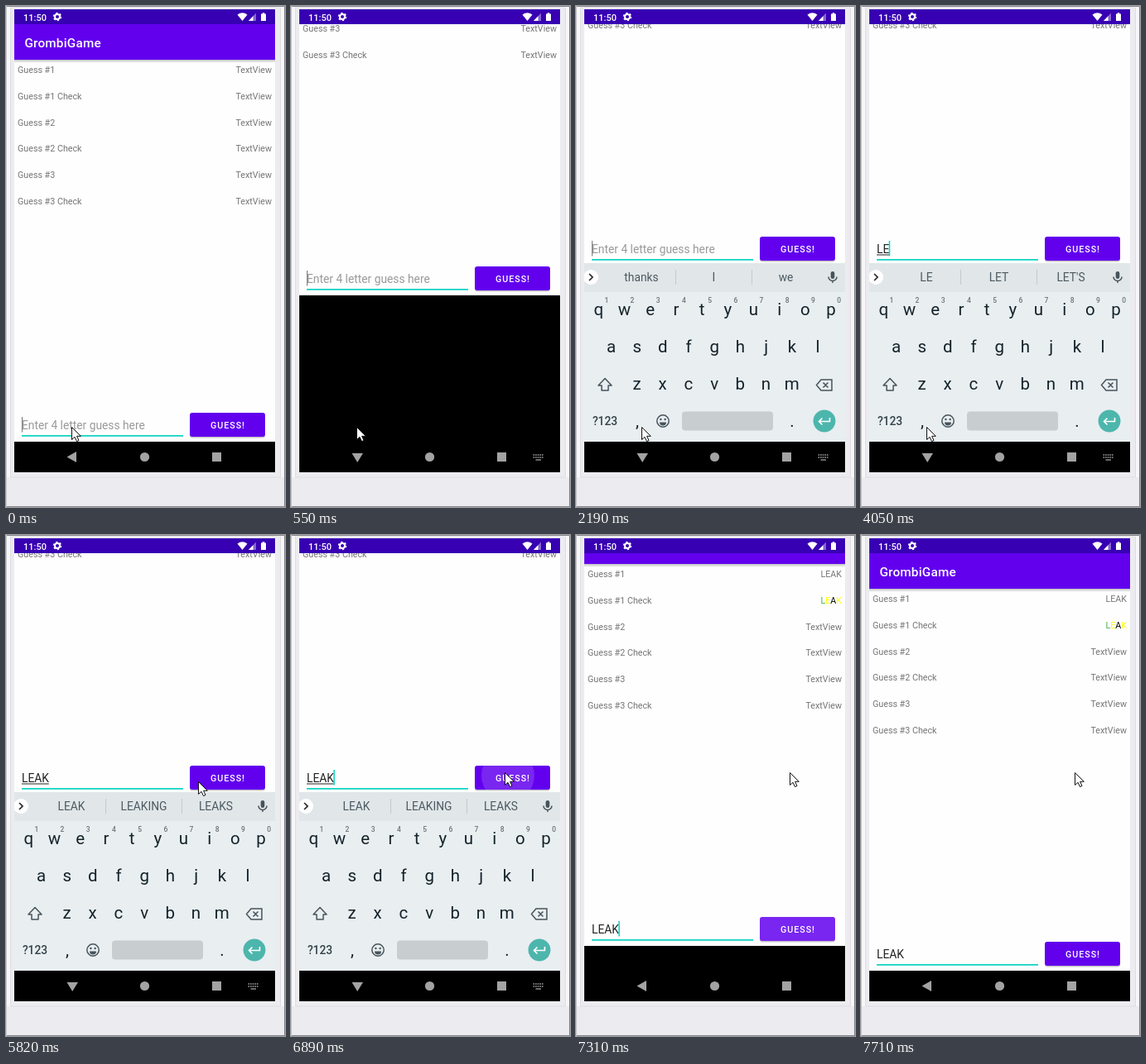
An HTML page for the animation above (8 s loop, 337 px wide and 606 px high).

```html
<!DOCTYPE html>
<html lang="en">
<head>
<meta charset="utf-8">
<title>Word guessing app</title>
<style>
  html, body { margin: 0; width: 100%; height: 100%; overflow: hidden; background: #ececf0; }
  svg { display: block; width: 337px; height: 606px; font-family: Roboto, sans-serif; }
  .row { font-size: 10.73px; fill: #757575; }
  .end { text-anchor: end; }
  .mid { text-anchor: middle; }
  .field { font-size: 13.8px; }
  .key { font-size: 20.5px; fill: #14232a; text-anchor: middle; }
  .num { font-size: 8.5px; font-weight: 500; fill: #6b7478; text-anchor: middle; }
  .sug { font-size: 13.8px; fill: #4c5a61; text-anchor: middle; }
  .line { fill: none; stroke: #46545b; stroke-width: 1.5; }
</style>
</head>
<body>
<svg viewBox="0 0 337 606">
  <defs>
    <clipPath id="screen"><rect x="10" y="22" width="315" height="542"/></clipPath>
    <clipPath id="btnClip"><rect x="222" y="492" width="91" height="29" rx="3"/></clipPath>
    <linearGradient id="shade" x2="0" y2="1">
      <stop stop-color="#000" stop-opacity=".25"/><stop offset="1" stop-color="#000" stop-opacity="0"/>
    </linearGradient>
  </defs>

  <!-- phone shell -->
  <rect width="337" height="606" fill="#ececf0"/>
  <path d="M0 0H5V570H0ZM331 0H336V570H331Z" fill="#f7f7f9"/>
  <path d="M5.5 2V570H331.5V2" fill="none" stroke="#dcdce1"/>
  <path d="M0 .5H336.5V606M0 605.5H337" fill="none" stroke="#85858a"/>
  <path d="M.5 0V606" stroke="#c9c9ce"/>
  <rect x="10" y="4" width="315" height="560"/>

  <g clip-path="url(#screen)">
    <g id="board">
      <rect x="10" y="311" width="315" height="36" fill="#e1e6e9"/>
      <rect x="10" y="346" width="315" height="181" fill="#e9eef1"/>
      <circle cx="18" cy="328" r="9" fill="#fff"/>
      <path d="M16 324l4 4-4 4" fill="none" stroke="#222" stroke-width="1.6"/>
      <path d="M120.5 319V337M212.5 319V337" stroke="#c3c9cc"/>
      <text class="sug" x="79" y="333"></text>
      <text class="sug" x="166.5" y="333"></text>
      <text class="sug" x="253.5" y="333"></text>
      <rect x="307.7" y="321" width="4.6" height="9" rx="2.3" fill="#46545b"/>
      <path class="line" d="M305 327.5a5 5 0 0 0 10 0M310 332.5V335" stroke-width="1.3"/>
      <g id="keys"></g>
      <path class="line" d="M35 450.5L43 459H39V465H31V459H27Z" stroke-linejoin="round"/>
      <path class="line" d="M296 452H309V465H296L290.500 458.500ZM298.500 455.500l6 6m0-6l-6 6"/>
      <text class="mid" x="35" y="507" font-size="13.8" font-weight="500" fill="#33434a">?123</text>
      <circle class="line" cx="105" cy="502" r="7.2"/>
      <circle cx="102.400" cy="500" r="1.200" fill="#46545b"/><circle cx="107.600" cy="500" r="1.200" fill="#46545b"/>
      <path d="M101 503.500h8a4 4 0 0 1-8 0Z" fill="#46545b"/>
      <rect x="128" y="490.500" width="110" height="23" rx="4" fill="#c8cdd0"/>
      <circle cx="300" cy="502" r="13.500" fill="#4db6ac"/>
      <path d="M306.500 498V502.500H294M297.500 498.500l-4 4 4 4" fill="none" stroke="#fff" stroke-width="1.600"/>
    </g>

    <g id="app">
      <rect x="10" y="22" width="315" height="505" fill="#fefefe"/>
      <rect x="10" y="65" width="315" height="4" fill="url(#shade)"/>
      <rect x="10" y="22" width="315" height="43" fill="#6200ee"/>
      <text x="22.500" y="49.500" font-size="15.300" font-weight="500" letter-spacing=".2" fill="#fff">GrombiGame</text>
      <g id="rows"></g>
      <text id="word" class="field" x="19" y="512"></text>
      <rect id="under" x="19" y="513.500" height="1" fill="#222"/>
      <rect x="19" y="519" width="195" height="1.800" fill="#16d5c4"/>
      <rect id="caret" y="497" height="18.500"/>
      <rect x="222" y="493.500" width="91" height="29" rx="3" fill="#000" opacity=".22"/>
      <rect x="222" y="492" width="91" height="29" rx="3" fill="#6200ee"/>
      <g clip-path="url(#btnClip)"><circle id="ripple" cx="262" cy="504" fill="#fff" opacity=".15"/></g>
      <text x="247" y="511" font-size="10.730" font-weight="500" letter-spacing=".96" fill="#fff">GUESS!</text>
    </g>
    <rect id="strip" x="10" y="311" width="315" height="4" fill="#e1e6e9"/>
  </g>

  <!-- status bar -->
  <rect x="10" y="4" width="315" height="18" fill="#3700b3"/>
  <text x="21" y="17.500" font-size="11" font-weight="500" fill="#fff">11:50</text>
  <circle cx="62" cy="13" r="3" fill="none" stroke="#fff" stroke-width="2"/>
  <circle cx="62" cy="13" r="4.400" fill="none" stroke="#fff" stroke-width="1.600" stroke-dasharray="2.300 2.308"/>
  <path d="M279.500 10.500Q285.500 6 291.500 10.500L285.500 18Z" fill="#fff"/>
  <path d="M302 8.500V18H293Z" fill="#fff" opacity=".4"/>
  <path d="M298.500 12.200V18H293Z" fill="#fff"/>
  <path d="M308 9.500H309.700V8.300H312.300V9.500H314V18H308Z" fill="#fff"/>

  <!-- navigation bar -->
  <g fill="#a3a3a3">
    <path id="back"/>
    <circle cx="167.500" cy="545.500" r="5.600"/>
    <rect x="249" y="540" width="11" height="11"/>
    <path id="dots" d="M292.500 543H305M292.500 546H305" stroke="#a3a3a3" stroke-width="1.600" stroke-dasharray="1.600 1"/>
  </g>
  <path id="dash" d="M295.500 549H302" stroke="#a3a3a3" stroke-width="1.300"/>

  <path id="mouse" d="M.5 .5V15.500L4 12.300L6.500 17.600L9 16.500L6.600 11.300H11.300Z" fill="#fff" stroke="#111" stroke-width="1"/>
</svg>
<script>
const $ = id => document.getElementById(id);
const LOOP = 8000;
const CARET_X = [19, 26, 33.600, 43, 51.300];

function add(parent, cls, x, y, str) {
  const el = document.createElementNS('http://www.w3.org/2000/svg', 'text');
  el.setAttribute('class', cls);
  el.setAttribute('x', x);
  el.setAttribute('y', y);
  el.textContent = str;
  parent.append(el);
  return el;
}

// guess list
const results = [];
for (let i = 0; i < 6; i++) {
  const y = 81 + i * 31.800;
  add($('rows'), 'row', 14, y, `Guess #${(i >> 1) + 1}${i % 2 ? ' Check' : ''}`);
  results.push(add($('rows'), 'row end', 321, y, 'TextView'));
}
const checked = add($('rows'), 'row end', 321, 112.800, '');
checked.innerHTML = [['L', '#4caf50'], ['E', '#ffff00'], ['A', '#000'], ['K', '#ffff00']]
  .map(([ch, col]) => `<tspan fill="${col}">${ch}</tspan>`).join('');

// keyboard letters
[['qwertyuiop', 27.300, 374], ['asdfghjkl', 42.500, 419], ['zxcvbnm', 73.500, 464]].forEach(([letters, x0, y], r) => {
  [...letters].forEach((ch, i) => {
    const x = x0 + i * 31.200;
    add($('keys'), 'key', x, y, ch);
    if (!r) add($('keys'), 'num', x + 9.500, 359, (i + 1) % 10);
  });
});
add($('keys'), 'key', 74, 509, ',');
add($('keys'), 'key', 261, 509, '.');

// each step changes only the listed properties
const steps = [
  [0, { pan: 0, board: 0, open: 0, word: '', caret: 1, compose: 0, ripple: 0, done: 0, mouse: [79, 509], sug: 'thanks I we' }],
  [550, { pan: -177, open: 1 }],
  [700, { pan: -206, board: .8 }],
  [820, { pan: -213, board: 1, caret: 0 }],
  [1100, { caret: 1 }],
  [1510, { caret: 0 }],
  [2190, { caret: 1 }],
  [2590, { caret: 0 }],
  [2810, { word: 'L', compose: 1, caret: 1, sug: 'L LOVE LIKE' }],
  [3220, { caret: 0 }],
  [3780, { caret: 1 }],
  [3930, { word: 'LE' }],
  [4050, { sug: "LE LET LET'S" }],
  [4360, { word: 'LEA' }],
  [4510, { sug: 'LEA LEAVE LEAVING' }],
  [4910, { word: 'LEAK' }],
  [5030, { sug: 'LEAK LEAKING LEAKS' }],
  [5430, { caret: 0 }],
  [5580, { mouse: [112, 452] }],
  [5700, { mouse: [190, 346] }],
  [5820, { mouse: [232, 298] }],
  [5940, { mouse: [253, 274], caret: 1 }],
  [6060, { mouse: [258, 268] }],
  [6370, { mouse: [258, 283] }],
  [6520, { mouse: [258, 287], caret: 0 }],
  [6890, { caret: 1, ripple: 32 }],
  [7010, { ripple: 80, compose: 0 }],
  [7160, { pan: -180, board: .26, open: 0 }],
  [7310, { pan: -30, board: 0, done: 1 }],
  [7430, { pan: 0, ripple: 0 }],
  [7710, { caret: 0 }]
];

const show = (id, on) => $(id).setAttribute('visibility', on ? 'visible' : 'hidden');
const shift = (id, x, y) => $(id).setAttribute('transform', `translate(${x} ${y})`);
const sugs = document.querySelectorAll('.sug');

function draw(s) {
  const n = s.word.length;
  shift('app', 0, s.pan);
  shift('board', 0, 213 + s.pan);
  shift('mouse', ...s.mouse);
  $('board').setAttribute('opacity', s.board);
  show('strip', s.board === 1);
  $('word').textContent = s.word || 'Enter 4 letter guess here';
  $('word').setAttribute('fill', n ? '#202020' : '#999');
  show('under', s.compose);
  $('under').setAttribute('width', CARET_X[n] - 18.500);
  show('caret', s.caret);
  $('caret').setAttribute('x', CARET_X[n]);
  $('caret').setAttribute('width', n ? 1.600 : 1);
  $('caret').setAttribute('fill', n ? '#16d5c4' : '#777');
  $('ripple').setAttribute('r', s.ripple);
  s.sug.split(' ').forEach((w, i) => sugs[i].textContent = w);
  results[0].textContent = s.done ? 'LEAK' : 'TextView';
  results[1].textContent = s.done ? '' : 'TextView';
  checked.setAttribute('visibility', s.done ? 'visible' : 'hidden');
  $('back').setAttribute('d', s.open ? 'M73.500 541H87L80.200 552Z' : 'M85 539V552L73.500 545.500Z');
  show('dots', s.open);
  show('dash', s.open);
}

const start = performance.now();
let last = -1;
function tick() {
  const t = (performance.now() - start) % LOOP;
  const past = steps.filter(([at]) => at <= t);
  if (past.length !== last) {
    last = past.length;
    draw(Object.assign({}, ...past.map(([, change]) => change)));
  }
  requestAnimationFrame(tick);
}
tick();
</script>
</body>
</html>
```
